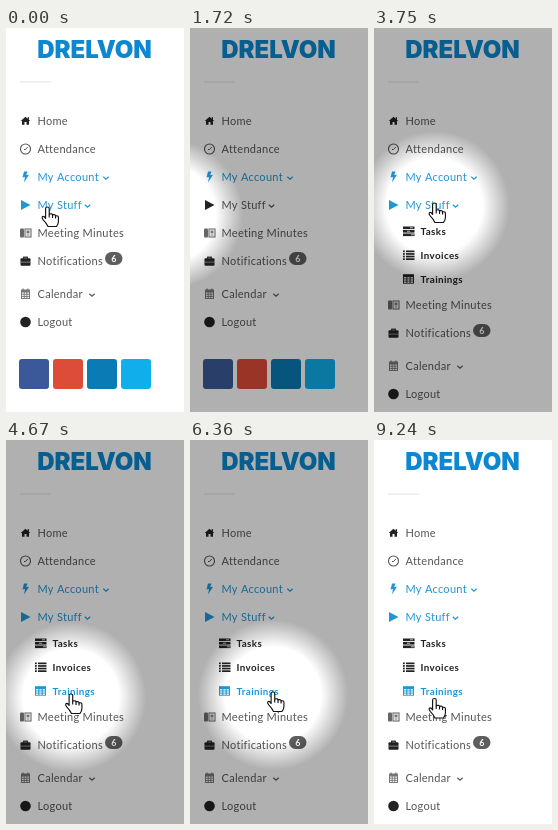
Animation of 178 by 384 pixels, one loop 9.69 s. Source, as an HTML page with a canvas:

```html
<!DOCTYPE html>
<html lang="en">
<head>
<meta charset="utf-8">
<title>Sidebar menu</title>
<style>
html, body { margin: 0; width: 100%; height: 100%; overflow: hidden; background: #fff; }
canvas { display: block; width: 178px; height: 384px; }
</style>
</head>
<body>
<canvas id="stage"></canvas>
<script>
const W = 178, H = 384, LOOP = 9690;
const BLUE = '#1f97d6', INK = '#555', DARK = '#222';
const canvas = document.getElementById('stage');
const dpr = window.devicePixelRatio || 1;
canvas.width = W * dpr;
canvas.height = H * dpr;
const c = canvas.getContext('2d');

// Bursts of stepped motion: start, end, number of steps
const BURSTS = [
  [20, 300, 3], [610, 1580, 7], [1720, 2470, 7], [2760, 3750, 8], [3900, 4920, 8],
  [5050, 5460, 4], [5820, 6770, 8], [7210, 7210, 1], [8700, 9240, 4]
];
// Pointer tip: time, x, y
const PATH = [
  [0, 41.5, 179], [480, 41.5, 179], [933, -4, 190], [1580, -30, 184], [2345, 60.5, 175],
  [3750, 60.5, 175], [4628, 65, 254], [4920, 75, 254], [5460, 42, 252],
  [5700, 42, 252], [6280, 84, 252], [6770, 43, 252], [7210, 42, 252],
  [8520, 42, 252], [9240, 60.5, 258.5]
];
const DIM = [[0, 0], [20, 0.33], [300, 1], [8520, 1], [9240, 0]];
const OPEN = [[0, 0], [2760, 0], [3467, 1]];

const HAND = new Path2D('M-2 1.5Q-2 0 0 0Q1.8 0 1.8 1.5V7.5Q5 6.5 5.3 8.3Q8.3 7.5 8.5 9.3' +
  'Q11.5 8.8 11.5 11V15Q11.5 18 9.5 20.5H.5Q-1 17 -4.5 13.5Q-6.5 11 -5 10Q-3.5 9.5 -2 12Z');
const KNUCKLES = new Path2D('M1.8 7.5V11M5.3 8.3V11.5M8.5 9.3V12');
const ARROW = new Path2D('M0 0V18.5L4.5 14.5 7.5 21.5 10.5 20.2 7.6 13.3H14Z');

const smooth = u => u * u * (3 - 2 * u);

function snap(t) {
  let s = 0;
  for (const [from, to, n] of BURSTS) {
    if (t < from) break;
    const dt = n > 1 ? (to - from) / (n - 1) : 1;
    s = from + Math.min(n - 1, Math.floor((t - from) / dt + 1e-6)) * dt;
  }
  return s;
}

function track(keys, t, ease = u => u) {
  let i = 0;
  while (i < keys.length - 1 && keys[i + 1][0] <= t) i++;
  const a = keys[i], b = keys[i + 1] || a;
  const u = b === a ? 0 : ease((t - a[0]) / (b[0] - a[0]));
  return a.slice(1).map((v, k) => v + (b[k + 1] - v) * u);
}

function label(str, x, y, color, font = '400 11px', gap = 0.28, align = 'left') {
  c.font = font + ' Lato, "Open Sans", sans-serif';
  c.letterSpacing = gap + 'px';
  c.textAlign = align;
  c.textBaseline = 'alphabetic';
  c.fillStyle = color;
  c.fillText(str, x, y);
}

function rect(x, y, w, h, color) {
  c.fillStyle = color;
  c.fillRect(x, y, w, h);
}

function round(x, y, w, h, r, color) {
  c.fillStyle = color;
  c.beginPath();
  c.roundRect(x, y, w, h, r);
  c.fill();
}

function poly(color, ...p) {
  c.fillStyle = color;
  c.beginPath();
  for (let i = 0; i < p.length; i += 2) c.lineTo(p[i], p[i + 1]);
  c.fill();
}

function line(color, width, ...p) {
  c.strokeStyle = color;
  c.lineWidth = width;
  c.beginPath();
  for (let i = 0; i < p.length; i += 2) c.lineTo(p[i], p[i + 1]);
  c.stroke();
}

function disc(x, y, r, color) {
  c.fillStyle = color;
  c.beginPath();
  c.arc(x, y, r, 0, 7);
  c.fill();
}

function ring(x, y, r, width, color) {
  c.strokeStyle = color;
  c.lineWidth = width;
  c.beginPath();
  c.arc(x, y, r, 0, 7);
  c.stroke();
}

function grid(x, y, w, h, color) {
  rect(x, y, w, h, color);
  for (let i = 0; i < 9; i++) {
    rect(x + 1 + (i % 3) * (w - 1) / 3, y + 3 + Math.floor(i / 3) * (h - 3) / 3,
      (w - 1) / 3 - 1, (h - 3) / 3 - 0.9, '#fff');
  }
}

const chevron = (x, y, color) => line(color, 1.2, x - 2.7, y - 1.2, x, y + 1.3, x + 2.7, y - 1.2);

// Icons take the centre of their row
const icons = {
  home(y) {
    poly(DARK, 14.7, y, 19.5, y - 4.2, 24.3, y, 23, y, 23, y + 3.7, 20.5, y + 3.7,
      20.5, y + 1, 18.5, y + 1, 18.5, y + 3.7, 16, y + 3.7, 16, y);
    rect(21.7, y - 3.8, 1.3, 2.5, DARK);
  },
  clock(y) {
    ring(19.5, y, 5, 1.1, INK);
    line(INK, 1, 18, y + 0.5, 19.5, y + 0.5, 21.8, y - 2);
  },
  bolt(y) {
    poly(BLUE, 18, y - 5.5, 21.5, y - 5.5, 20.2, y - 2, 23, y - 2.3, 18, y + 5.5, 19, y, 16.5, y + 0.5);
  },
  play(y, color) {
    poly(color, 15, y - 5, 24.5, y, 15, y + 5);
  },
  news(y) {
    round(14, y - 4.5, 4, 9, 1, '#666');
    c.strokeStyle = '#666';
    c.lineWidth = 1.1;
    c.strokeRect(19, y - 4, 6, 8);
    rect(20.5, y - 2.5, 3, 3, '#777');
    rect(20.5, y + 1.5, 3, 1, '#777');
  },
  bag(y) {
    c.strokeStyle = DARK;
    c.lineWidth = 1.2;
    c.strokeRect(17.7, y - 3.8, 3.6, 3);
    round(14.5, y - 2.7, 10, 7.4, 1, DARK);
    rect(14.5, y + 0.7, 10, 0.8, '#999');
  },
  calendar(y) {
    grid(15, y - 4.5, 9, 9.5, '#777');
    rect(16.5, y - 5.5, 1.2, 2, '#777');
    rect(21.3, y - 5.5, 1.2, 2, '#777');
  },
  dot(y) {
    disc(19.5, y, 5.3, DARK);
  },
  tasks(y, color) {
    for (let i = 0; i < 3; i++) {
      rect(29, y - 4.5 + i * 3.5, 11.5, 2.6, color);
      rect([36, 33, 37][i], y - 3.8 + i * 3.5, 3, 1.1, '#aaa');
    }
  },
  list(y, color) {
    for (let i = 0; i < 4; i++) {
      rect(29, y - 4.5 + i * 2.6, 1.8, 1.7, color);
      rect(32, y - 4.5 + i * 2.6, 8.5, 1.7, color);
    }
  },
  table(y, color) {
    grid(29, y - 4.8, 11, 9.5, color);
  }
};

function row(icon, str, y, color = INK, chevronX = 0) {
  icons[icon](y, color === INK ? DARK : color);
  label(str, 31.5, y + 4, color);
  if (chevronX) chevron(chevronX, y + 1, color);
}

function menu(t, x, y) {
  const [open] = track(OPEN, t, smooth);
  const drop = 72 * open;
  const over = (rowY, h) => x > 10 && Math.abs(y - rowY) < h;

  label('DRELVON', 88.5, 29.7, '#0d88d0', '900 24px Inter,', 0, 'center');
  rect(14, 53.5, 31, 1, '#e2e2e2');

  row('home', 'Home', 93);
  row('clock', 'Attendance', 121);
  row('bolt', 'My Account', 149, BLUE, 100);
  row('play', 'My Stuff', 177, t >= 2760 || over(177, 13) ? BLUE : INK, 81.5);

  if (drop > 0) {
    c.save();
    c.beginPath();
    c.rect(0, 190, W, drop);
    c.clip();
    [['tasks', 'Tasks'], ['list', 'Invoices'], ['table', 'Trainings']].forEach(([icon, str], i) => {
      const rowY = 203 + i * 24;
      const color = over(rowY, 12) ? BLUE : DARK;
      icons[icon](rowY, color);
      label(str, 46.5, rowY + 3.7, color, '700 9.8px', 0.4);
    });
    c.restore();
  }

  c.save();
  c.translate(0, drop);
  row('news', 'Meeting Minutes', 205);
  row('bag', 'Notifications', 233);
  round(99, 224, 17.5, 13, 6.5, '#5e5e5e');
  label('6', 107.8, 234, '#fff', '700 9px', 0, 'center');
  row('calendar', 'Calendar', 266, INK, 86);
  row('dot', 'Logout', 294);
  ['#3b5998', '#dd4b39', '#0a7bb5', '#10aeea'].forEach((color, i) =>
    round(13 + i * 34, 331, 30, 30, 3, color));
  c.restore();
}

function spotlight(x, y, dim) {
  if (dim <= 0) return;
  const g = c.createRadialGradient(x, y, 0, x, y, 75);
  const shade = a => `rgba(0,0,0,${0.31 * a * dim})`;
  g.addColorStop(0, shade(0));
  g.addColorStop(0.64, shade(0));
  g.addColorStop(0.82, shade(0.5));
  g.addColorStop(1, shade(1));
  rect(0, 0, W, H, g);
}

function pointer(x, y) {
  const shape = x > 10 ? HAND : ARROW;
  c.save();
  c.translate(x, y);
  if (shape === HAND) c.scale(0.95, 0.95);
  c.lineJoin = 'round';
  c.lineWidth = 1.2;
  c.fillStyle = '#fff';
  c.strokeStyle = '#111';
  c.fill(shape);
  c.stroke(shape);
  if (shape === HAND) c.stroke(KNUCKLES);
  c.restore();
}

function draw(now) {
  const t = snap(now % LOOP);
  const [x, y] = track(PATH, t, smooth);
  const [dim] = track(DIM, t);
  c.setTransform(dpr, 0, 0, dpr, 0, 0);
  rect(0, 0, W, H, '#fff');
  menu(t, x, y);
  spotlight(x, y + 3, dim);

  const click = (t - 2760) / 420;
  if (click >= 0 && click < 1) {
    ring(x, y + 2, 23.5 + 8 * click, 4.5, `rgba(236,100,100,${0.85 * (1 - click)})`);
  }
  pointer(x, y);
}

const start = performance.now();
function tick() {
  draw(performance.now() - start);
  requestAnimationFrame(tick);
}
tick();
</script>
</body>
</html>
```
